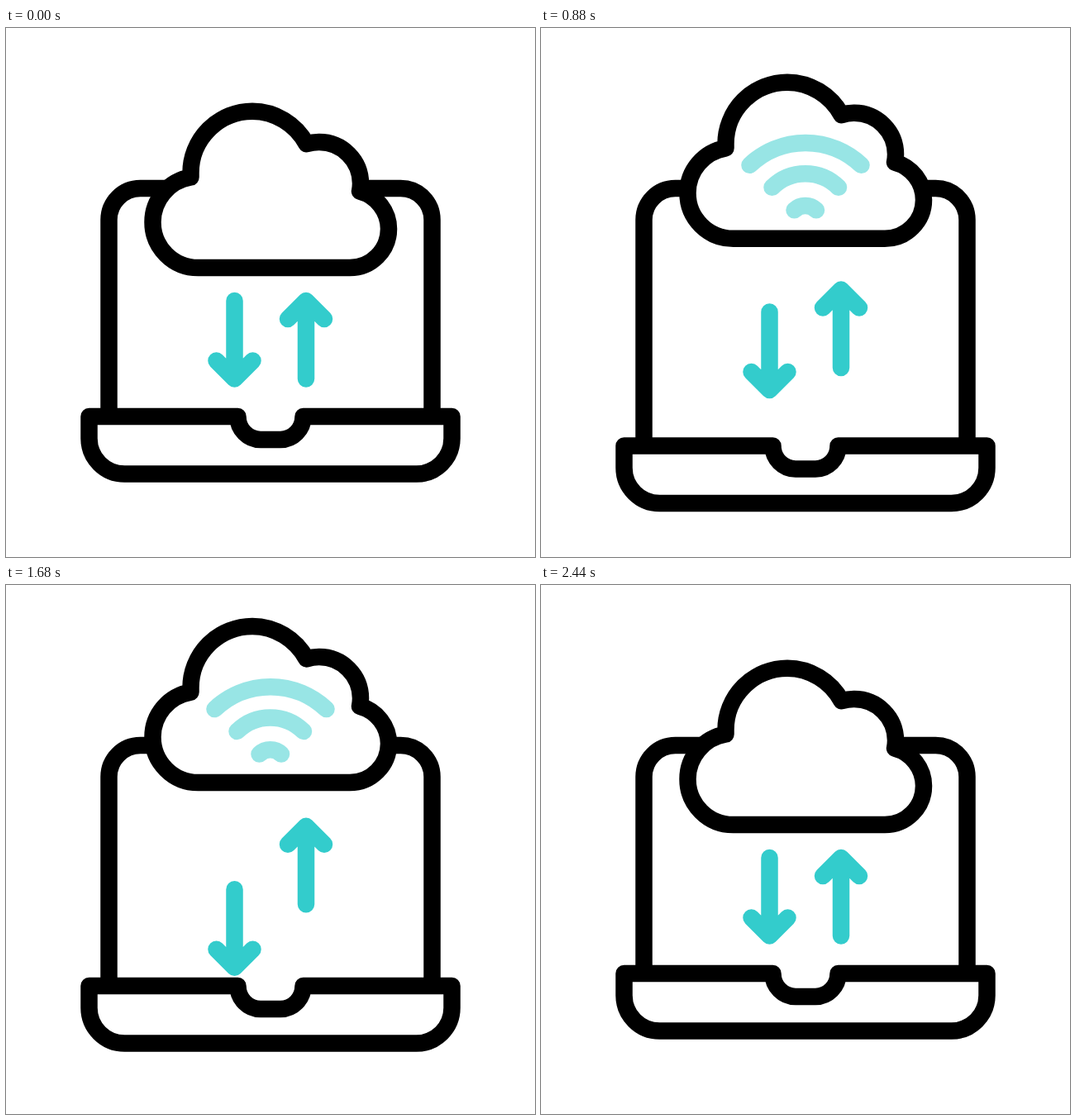
These frames come from a looping animation (640x640 px, 2.84 s). An HTML page:

```html
<!DOCTYPE html>
<html lang="en">
<head>
<meta charset="utf-8">
<title>Cloud transfer</title>
<style>
  html, body { margin: 0; width: 100%; height: 100%; overflow: hidden; background: #fff; }
  svg { display: block; width: 100%; height: 100%; }
  path { fill: none; stroke: #000; stroke-width: 20.5; stroke-linejoin: round; }
  .teal path { stroke: #3cc; stroke-linecap: round; }
  #cloud > path { fill: #fff; }
</style>
</head>
<body>
<svg viewBox="0 0 640 640">
  <path id="screen"/>
  <path id="base" d="M280.5 470H100.5V496.5A43 43 0 0 0 143.5 539.5H496.5A43 43 0 0 0 539.5 496.5V470H359.5A27.5 28 0 0 1 332 498H308A27.5 28 0 0 1 280.5 470Z"/>
  <g id="cloud">
    <path d="M223.5 180.5V175.5A74.6 74.6 0 0 1 298 100.8A74.6 74.6 0 0 1 363.5 140.3A50 50 0 0 1 379 138A50 50 0 0 1 429 188A50 50 0 0 1 428 197.7A47 47 0 0 1 463 243A47 47 0 0 1 416 290H232.5A55 55 0 0 1 177.5 235A55 55 0 0 1 223.5 180.5Z"/>
    <g class="teal" id="waves">
      <path d="M306.5 255.5A19 19 0 0 1 333 255.5"/>
      <path d="M279.5 228A57 57 0 0 1 360 228"/>
      <path d="M252.5 201A98 98 0 0 1 387.5 201"/>
    </g>
  </g>
  <g class="teal">
    <path id="down" d="M276.5 330V424.5M254.5 402.5L276.5 424.5L298.5 402.5"/>
    <path id="up" d="M363 424.5V330M341 352L363 330L385 352"/>
  </g>
</svg>
<script>
const LOOP = 2840, STEP = 40;
const $ = id => document.getElementById(id);
const waves = [...$('waves').children];
const clamp = x => Math.min(1, Math.max(0, x));
const smooth = u => u * u * (3 - 2 * u);
const linear = u => u;

// Keys are [time, value] pairs.
function track(t, keys, ease = smooth) {
  let value = keys[0][1];
  for (let i = 1; i < keys.length; i++) {
    const [t0, v0] = keys[i - 1], [t1, v1] = keys[i];
    if (t >= t0) value = v0 + (v1 - v0) * ease(clamp((t - t0) / (t1 - t0)));
  }
  return value;
}

const cloudKeys = [[0, 0], [606, -52], [1100, -23], [1610, -52], [2425, 0]];
const baseKeys = [[0, 0], [1080, 39], [2120, 0]];
const arrowKeys = [[0, 0], [550, 38.5], [1100, 0], [1650, 38.5], [2200, 0]];
const shift = (id, y) => $(id).setAttribute('transform', `translate(0 ${y})`);

function draw(t) {
  const base = track(t, baseKeys), arrow = track(t, arrowKeys);
  $('screen').setAttribute('d',
    `M124.5 ${470 + base}V232A38 38 0 0 1 162.5 194H477.5A38 38 0 0 1 515.5 232V${470 + base}`);
  shift('base', base);
  shift('cloud', track(t, cloudKeys));
  shift('down', arrow);
  shift('up', -arrow);
  waves.forEach((wave, i) => {
    const start = 80 + 80 * i, end = 1880 + 110 * i;
    wave.setAttribute('opacity', track(t, [
      [start, 0], [start + 188, 0.5], [1700, 0.5], [1880, 1], [end + 0.1, 1], [end + 80, 0]
    ], linear));
  });
}

function tick() {
  draw(Math.floor(performance.now() % LOOP / STEP) * STEP);
  requestAnimationFrame(tick);
}
tick();
</script>
</body>
</html>
```
